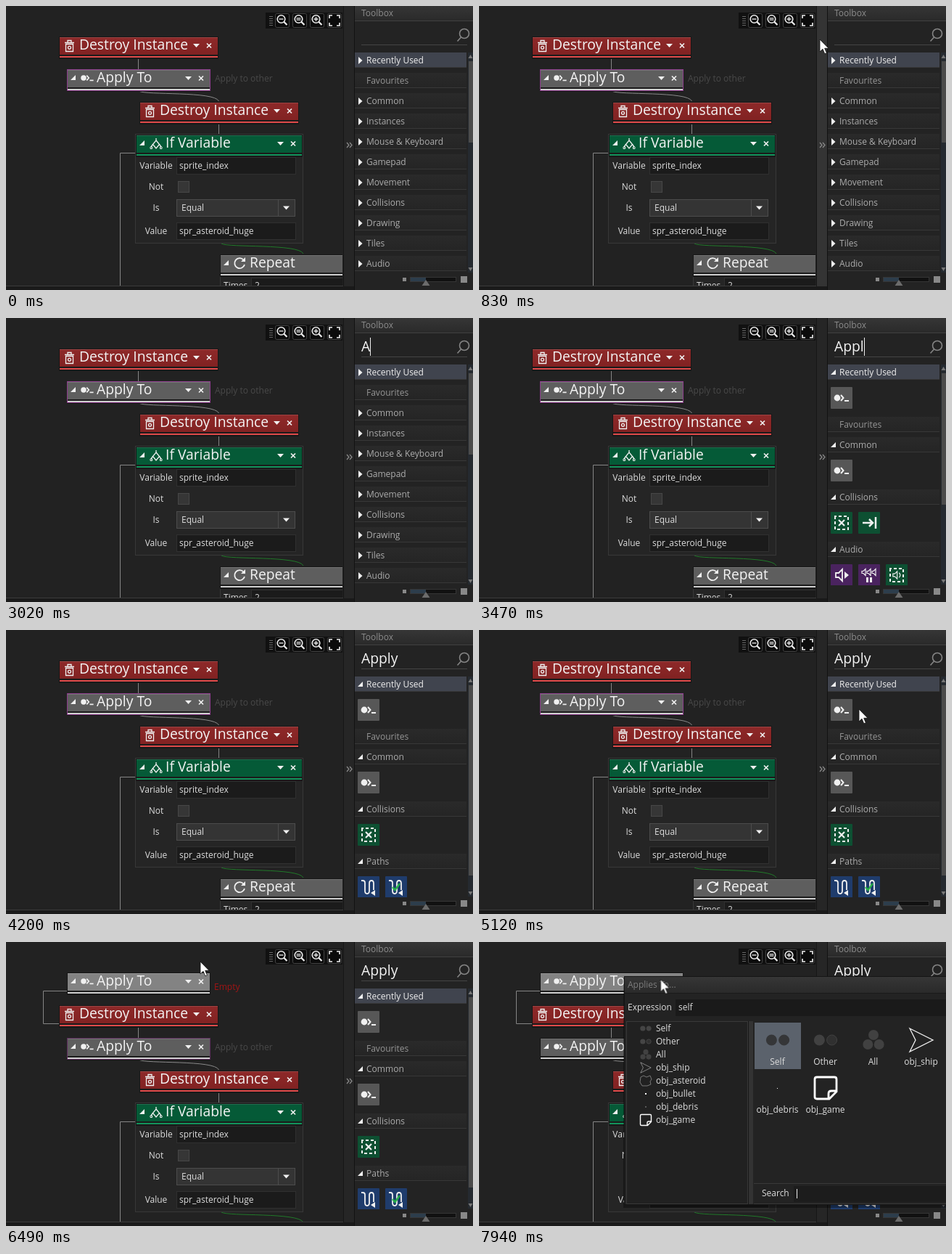
Write an HTML page that moves like this. It is 644 px wide and 391 px high and loops after 8 s.

```html
<!DOCTYPE html>
<html lang="en">
<head>
<meta charset="utf-8">
<title>Visual scripting: Apply To</title>
<style>
  html, body { margin: 0; width: 100%; height: 100%; overflow: hidden; background: #222; }
  svg { display: block; width: 644px; height: 391px; }
  text { font: 12px "Open Sans", "Noto Sans", sans-serif; fill: #ddd; white-space: pre; }
  .big { font-size: 19.3px; fill: #f4f4f4; }
  .mid { text-anchor: middle; }
  .ink { fill: none; stroke: #f0f0f0; stroke-width: 1.3; }
  .wire { fill: none; stroke: #858585; }
</style>
</head>
<body>
<svg id="stage" viewBox="0 0 644 391"></svg>
<script>
const LOOP = 8000;

// ---- drawing helpers ----
const rect = (x, y, w, h, fill, more = '') =>
  `<rect x="${x}" y="${y}" width="${w}" height="${h}" fill="${fill}" ${more}/>`;
const box = (x, y, w, h, fill, stroke, more = '') =>
  rect(x + .5, y + .5, w - 1, h - 1, fill, `stroke="${stroke}" ${more}`);
const text = (x, y, s, fill = '#ddd', cls = '') =>
  `<text x="${x}" y="${y}" class="${cls}" style="fill:${fill}">${s}</text>`;
const big = (x, y, s) => `<text x="${x}" y="${y}" class="big">${s}</text>`;
const shape = (d, fill = '#f0f0f0') => `<path d="${d}" fill="${fill}"/>`;
const ink = (d, width = 1.3) => `<path class="ink" d="${d}" style="stroke-width:${width}"/>`;
const wire = (d, color = '#858585') => `<path class="wire" d="${d}" style="stroke:${color}"/>`;
const dot = (x, y, r, fill = '#f0f0f0') => `<circle cx="${x}" cy="${y}" r="${r}" fill="${fill}"/>`;
const at = (x, y, s) => `<g transform="translate(${x} ${y})">${s}</g>`;
const scaled = (k, s) => `<g transform="scale(${k})">${s}</g>`;
const group = (id, s) => `<g id="${id}">${s}</g>`;

// ---- icons ----
const applyIcon = dot(0, 0, 4.4) + ink('M5-4l3.5 4L5 4', 2) + ink('M10 4h6', 2);
const trashIcon = ink('M0 4.5h13M4 4V1.5h5V4M1.5 6.5v10h10v-10z') + `<circle class="ink" cx="6.5" cy="11.3" r="2"/>`;
const branchIcon = ink('M8 1v3M8 4l4.5 5.5L8 15 3.5 9.5z') + ink('M3.5 9.5L1 13M12.5 9.5L15 13') +
  ink('M0 13h2.5v2.5H0zM13.5 13h2.5v2.5h-2.5z', 1);
const loopIcon = ink('M5.5-4.5A7 7 0 1 0 7 2', 1.8) + shape('M8-8v6H2z');
const corner = shape('M0 6h7V-1z');
const dashed = `<path class="ink" d="M-9-9H9V9H-9z" style="stroke-width:2" stroke-dasharray="4 3" stroke-dashoffset="2"/>`;
const speaker = ink('M-8-3h4l5-5V8l-5-5h-4z', 1.8);
const squiggle = ink('M-10-9h2q3 0 3 3V5q0 4 3 4t3-4V-5q0-4 3-4t3 4V4', 1.8) + shape('M3 8l6-4v8z');
const tick = (color, w) => `<path d="M-5 0l3.5 4L5-5" fill="none" stroke="${color}" stroke-width="${w}"/>`;
const lens = (x, y, r) => `<circle class="ink" cx="${x}" cy="${y}" r="${r}" style="stroke-width:1.6"/>` +
  ink(`M${x + r * .7} ${y + r * .7}l${r * .8} ${r * .8}`, 2.2);

const tiles = {
  apply: ['#575757', at(-6, 0, applyIcon)],
  hit: ['#0d5032', dashed + ink('M-4-4L4 4M-4 4L4-4', 2.2)],
  move: ['#0d5032', ink('M-9 0H5M0-5l5 5-5 5M9-8V8', 2.5)],
  play: ['#4a235f', speaker + shape('M4-5l6 5-6 5z')],
  pause: ['#4a235f', [-7, 0, 7].map(x => at(x, -4, ink('M-3-1.5h2l3-3v9l-3-3h-2z', 1.2))).join('') +
    rect(-4, 3, 3, 7, '#eee') + rect(1, 3, 3, 7, '#eee')],
  region: ['#0d5032', dashed + scaled(.65, speaker + ink('M5-5q5 5 0 10', 1.8))],
  path: ['#1f3c6c', squiggle],
  check: ['#1f3c6c', squiggle + tick('#27b04a', 2.5)],
};
const tile = (name, x, y) => rect(x, y, 30, 30, tiles[name][0], 'rx="1"') + at(x + 15, y + 15, tiles[name][1]);

// ---- action blocks ----
function block(x, y, w, fill, line, title, tx, icon) {
  return box(x, y, w, 31, '#1b1b1b', '#171717') +
    rect(x + 1, y + 1, w - 2, 24, fill) + rect(x + 1, y + 1, w - 2, 1, '#fff', 'opacity=".13"') +
    rect(x + 1, y + 27, w - 2, 2, line) + icon + big(x + tx, y + 18, title) +
    shape(`M${x + w - 35} ${y + 10}h9l-4.5 5z`) +
    ink(`M${x + w - 16} ${y + 9.5}l6 6m0-6l-6 6`, 1.7);
}
const destroy = (x, y) =>
  block(x, y, 220, 'url(#red)', '#e04a4a', 'Destroy Instance', 28, at(x + 8, y + 4, trashIcon));
const apply = (x, y, fill = '#5e5e5e') =>
  block(x, y, 198, fill, '#cfcfcf', 'Apply To', 41, at(x + 5, y + 9, corner) + at(x + 23, y + 12, scaled(.85, applyIcon)));
const field = (y, s) => box(235, y, 165, 24, '#1b1b1b', '#303030') + text(239, y + 16, s);

const ifBlock = box(178, 176, 232, 151, '#252525', '#383838') +
  block(179, 177, 230, '#055a37', '#12935b', 'If Variable', 41, at(184, 186, corner) + at(199, 181, branchIcon)) +
  [['Variable', 224], ['Not', 253], ['Is', 282], ['Value', 314]].map(([s, y]) => text(207, y, s, '#ddd', 'mid')).join('') +
  field(208, 'sprite_index') + box(237, 241, 16, 16, '#363636', '#474747') +
  box(235, 266, 164, 24, '#343434', '#4c4c4c') + rect(375, 267, 1, 22, '#4c4c4c') +
  text(242, 282, 'Equal') + shape('M382 275.5h9l-4.5 5z') + field(298, 'spr_asteroid_huge');

const repeatBlock = box(295, 342, 180, 70, '#252525', '#383838') +
  block(295, 342, 230, '#5e5e5e', '#cfcfcf', 'Repeat', 41, at(300, 351, corner) + at(322, 354, loopIcon)) +
  text(300, 389, 'Times') + box(338, 374, 140, 24, '#1b1b1b', '#303030') + text(343, 389, '2');

const chain = wire('M182.5 73V87M293.5 162V177M179 202.5H157.5V400') +
  wire('M183 117C192 123 288 117 293.5 131', '#8a8a8a') +
  wire('M297 327C306 333 404 327 410 341', '#217a2a') +
  destroy(73, 42) + apply(84, 87) +
  group('picked', box(84, 87, 198, 30, 'none', '#8c3c8c')) + text(288, 104, 'Apply to other', '#494949') +
  destroy(184, 132) + ifBlock + repeatBlock;

const dropped = wire('M84 67.5H51.5V112.5H73') + apply(84, 42, '#838383') + text(287, 66, 'Empty', '#a31515');

const toolButton = (x, s) => box(x - 10, 10, 20, 20, '#0b0b0b', '#444', 'rx="2"') + s;
const zoom = (x, inner) => toolButton(x, lens(x - 1.5, 18, 5.3) + ink(inner));
const toolbar = rect(358, 9, 106, 22, '#111') +
  [0, 1, 2, 3, 4].map(i => rect(363, 14 + i * 3, 5, 1, '#666')).join('') +
  zoom(381, 'M376.5 18h6') + zoom(405, 'M400.5 16.8h6m-6 2.4h6') + zoom(429, 'M424.5 18h6m-3-3v6') +
  toolButton(453, ink('M446 17v-4h4m6 0h4v4m0 6v4h-4m-6 0h-4v-4', 1.6));

const ghost = at(-376, -47, `<g opacity=".36">${apply(387, 56)}</g>`);
const dragIcon = at(9, 9, dashed) + `<path d="M5 5v10l2.5-2 2 4 2-1-2-4h3z" fill="#fff" stroke="#111" stroke-width=".5"/>` +
  box(10, 11, 18, 18, '#1a6b2c', '#84c48b') + at(19, 20, tick('#e4ffe6', 2.3));

// ---- toolbox ----
function row(y, label, mark) {
  const top = label === 'Recently Used';
  const marker = { open: at(485, y - 3, corner), closed: shape(`M486 ${y - 5}v10l5.5-5z`), none: '' }[mark];
  return rect(481, y - 11, 154, 20, top ? '#40444e' : 'url(#row)') +
    rect(481, y + 9, 154, 1, '#383838') + marker +
    text(497, y + 4, label, top ? '#f0f0f0' : mark === 'none' ? '#969696' : '#acacac');
}
const thumb = h => rect(638, 76, 6, h, '#4b4b4b');
const plainList = ['Recently Used', 'Favourites', 'Common', 'Instances', 'Mouse &amp; Keyboard', 'Gamepad',
  'Movement', 'Collisions', 'Drawing', 'Tiles', 'Audio']
  .map((s, i) => row(75 + i * 28, s, i === 1 ? 'none' : 'closed')).join('') + thumb(112);
const results = (collisions, last, lastTiles, h) =>
  [['Recently Used', 75, ['apply']], ['Favourites', 147, []], ['Common', 175, ['apply']],
   ['Collisions', 247, collisions], [last, 319, lastTiles]].map(([s, y, names]) =>
    row(y, s, names.length ? 'open' : 'none') + names.map((n, i) => tile(n, 485 + i * 38, y + 20)).join('')
  ).join('') + thumb(h);

const toolbox = rect(466, 0, 14, 386, '#262626') + group('grip', rect(466, 0, 14, 386, '#343434')) +
  rect(465, 0, 1, 386, '#161616') + rect(480, 0, 1, 391, '#121212') +
  `<path class="ink" d="M470 188l3 3.5-3 3.5m4-7l3 3.5-3 3.5" style="stroke:#888"/>` +
  rect(481, 0, 163, 391, '#232323') + rect(481, 0, 163, 20, 'url(#bar)') + rect(481, 20, 163, 1, '#414141') +
  text(490, 14, 'Toolbox', '#8d8d8d') + rect(490, 53, 146, 1, '#444') +
  `<g fill="none" stroke="#858585" stroke-width="1.6"><circle cx="632" cy="38" r="6.5"/><path d="M627.5 43l-5 5.5"/></g>` +
  rect(637, 64, 7, 303, '#252a30') + shape('M637.5 72h6l-3-5z', '#777') + shape('M637.5 360h6l-3 5z', '#777') +
  `<g clip-path="url(#list)">` + group('all', plainList) +
  group('found', results(['hit', 'move'], 'Audio', ['play', 'pause', 'region'], 181)) +
  group('narrowed', results(['hit'], 'Paths', ['path', 'check'], 262)) + '</g>' +
  [...'Apply'].map((_, i) => group('typed' + i, big(490, 46, 'Apply'.slice(0, i + 1)))).join('') +
  group('caret', rect(0, 27, 1, 25, '#eee')) +
  rect(547, 374, 5, 5, '#888') + box(557, 373, 64, 7, '#111', '#363636') + rect(558, 374, 21, 5, '#2d3d4c') +
  shape('M573.5 385h11l-5.5-8z', '#6c6c6c') + rect(627, 372, 9, 9, '#888');

// ---- target dialog ----
const pair = (x, y, r, a, b) => dot(x - r * 1.15, y, r, a) +
  `<circle cx="${x + r * 1.15}" cy="${y}" r="${r - .5}" fill="${b}" stroke="${a}"/>`;
const trio = r => [[0, -1], [-1.1, .85], [1.1, .85]].map(([x, y]) => dot(x * r, y * r, r, '#414141')).join('');
const page = `<path d="M-12-15H12Q15-15 15-12V5L5 15H-12Q-15 15-15 12V-12Q-15-15-12-15zM15 4H8Q4 4 4 8V15" fill="none" stroke="#fff" stroke-width="2.8"/>`;
const ship = ink('M-16-16L16 0-16 16-8 0z');
const rock = `<path class="ink" d="M-7-5l4-2 4 2 5-2 2 5-2 3 1 4-5 2h-7l-3-5z" style="stroke:#777;stroke-width:1"/>`;
const targets = [
  ['Self', pair(0, 0, 3.6, '#454545', '#454545')], ['Other', pair(0, 0, 3.6, '#454545', '#303030')],
  ['All', trio(3.6)], ['obj_ship', scaled(.45, `<g opacity=".8">${ship}</g>`)],
  ['obj_asteroid', rock], ['obj_bullet', rect(-1, -1, 2, 2, '#fff')],
  ['obj_debris', rect(-.5, -.5, 1, 1, '#fff')], ['obj_game', scaled(.5, page)],
];
const cards = [
  ['Self', 0, 0, pair(0, 0, 7.5, '#353638', '#353638')], ['Other', 1, 0, pair(0, 0, 7.5, '#414141', '#303030')],
  ['All', 2, 0, trio(7)], ['obj_ship', 3, 0, ship],
  ['obj_debris', 0, 1, rect(-1, 0, 1, 1, '#fff')], ['obj_game', 1, 1, page],
];
const dialog = rect(199, 49, 460, 317, '#000', 'opacity=".35"') + box(200, 47, 460, 315, '#232323', '#151515') +
  rect(201, 48, 443, 22, 'url(#bar)') + rect(201, 70, 443, 1, '#1a1a1a') +
  text(205, 63, 'Applies To...', '#7d7d7d') + text(205, 94, 'Expression') +
  rect(271, 79, 373, 23, '#1a1a1a') + text(275, 94, 'self') +
  box(203, 109, 168, 252, '#212121', '#393939') + rect(372, 109, 6, 252, '#333') + rect(371, 109, 1, 252, '#151515') +
  targets.map(([s, icon], i) => at(230, 119 + i * 18, icon) + text(244, 123 + i * 18, s)).join('') +
  rect(380, 111, 64, 64, '#5b626c') +
  cards.map(([s, i, j, icon]) => at(412 + i * 66, 135 + j * 66, icon) + text(411.5 + i * 66, 169 + j * 66, s, '#ddd', 'mid')).join('') +
  rect(379, 332, 265, 1, '#393939') + rect(434, 336, 210, 22, '#1c1c1c') +
  text(390, 350, 'Search') + rect(438, 340, 1, 13, '#eee') + rect(379, 360, 265, 1, '#393939');

const grad = (id, a, b) => `<linearGradient id="${id}" x2="0" y2="1"><stop stop-color="${a}"/><stop offset="1" stop-color="${b}"/></linearGradient>`;
const clip = (id, ...r) => `<clipPath id="${id}">${rect(...r, '#fff')}</clipPath>`;

document.getElementById('stage').innerHTML =
  `<defs>${grad('red', '#8e2929', '#812222')}${grad('row', '#2a2a2a', '#252525')}${grad('bar', '#363636', '#2a2a2a')}
   ${clip('work', 0, 0, 464, 385)}${clip('list', 481, 60, 163, 308)}</defs>` +
  rect(0, 0, 644, 391, '#222') +
  `<g clip-path="url(#work)">` + group('chain', chain) + group('dropped', dropped) +
  group('slot', rect(72, 31, 222, 11, '#3b3b61')) + group('ghost', ghost) + toolbar + '</g>' +
  rect(0, 385, 480, 1, '#3b3b3b') + rect(0, 386, 480, 5, '#1a1a1a') +
  toolbox + group('dialog', dialog) + group('drag', dragIcon) +
  group('mouse', `<path d="M0 0V17L4 13.3L6.8 19.8L9.4 18.7L6.7 12.3H12z" fill="#fff" stroke="#111" stroke-width=".8"/>`);

// ---- motion ----
function steps(id, prop, table) {
  const frames = table.map(([t, v]) => ({ offset: t / LOOP, [prop]: v, easing: 'step-end' }));
  frames.push({ offset: 1, [prop]: table.at(-1)[1] });
  document.getElementById(id).animate(frames, { duration: LOOP, iterations: Infinity });
}
// Times alternate between on and off; a leading 0 starts visible.
function show(id, ...times) {
  const table = times.map((t, i) => [t, i % 2 ? 0 : 1]);
  steps(id, 'opacity', times[0] ? [[0, 0], ...table] : table);
}
const move = (id, table) => steps(id, 'transform', table.map(([t, x, y]) => [t, `translate(${x}px, ${y}px)`]));
// Evenly timed stops, one every 90 ms.
const run = (start, ...points) => points.map(([x, y], i) => [start + i * 90, x, y]);
const away = [-100, -100];

show('all', 0, 3110);
show('found', 3110, 3740);
show('narrowed', 3740);
const typing = [3020, 3200, 3380, 3470, 3650];
typing.forEach((t, i) => i < 4 ? show('typed' + i, t, typing[i + 1]) : show('typed4', t));
show('caret', 280, 740, 1280, 1730, 2190, 2650, 3020, 4200, 4670, 5120);
move('caret', [[0, 490, 0], ...typing.map((t, i) => [t, [502, 514, 526, 531, 541][i], 0])]);

show('grip', 830, 920, 5390, 5480);
show('slot', 5570, 6490);
show('dropped', 6490);
move('chain', [[0, 0, 0], [6490, 0, 45]]);
steps('picked', 'opacity', [[0, 1], [6490, .6], [6580, 0]]);
steps('dialog', 'opacity', [[0, 0], [7580, .6], [7670, 1]]);

const dragPath = [[0, ...away],
  ...run(5300, [488, 112], [458, 114], [440, 108], [408, 78], [376, 47], [338, 35], [304, 28], [278, 24], [263, 23]),
  [6490, ...away]];
move('drag', dragPath);
move('ghost', dragPath);
move('mouse', [[0, ...away],
  ...run(650, [429, -4], [446, 22], [470, 46], [496, 66], [516, 78], [527, 82]),
  ...run(1460, [548, 72], [576, 50], [600, 20], [614, -5]),
  ...run(2010, [613, -9], [612, -15], away),
  ...run(4670, [634, 62], [606, 80], [574, 96], [548, 105], [530, 109], [524, 109], [508, 112], away),
  [6490, 268, 27],
  ...run(6860, [266, 30], [263, 35], [260, 40], [258, 44], [256, 47], [254, 49], [253, 50]),
  [7580, ...away], [7940, 250.5, 51.5]]);
</script>
</body>
</html>
```
